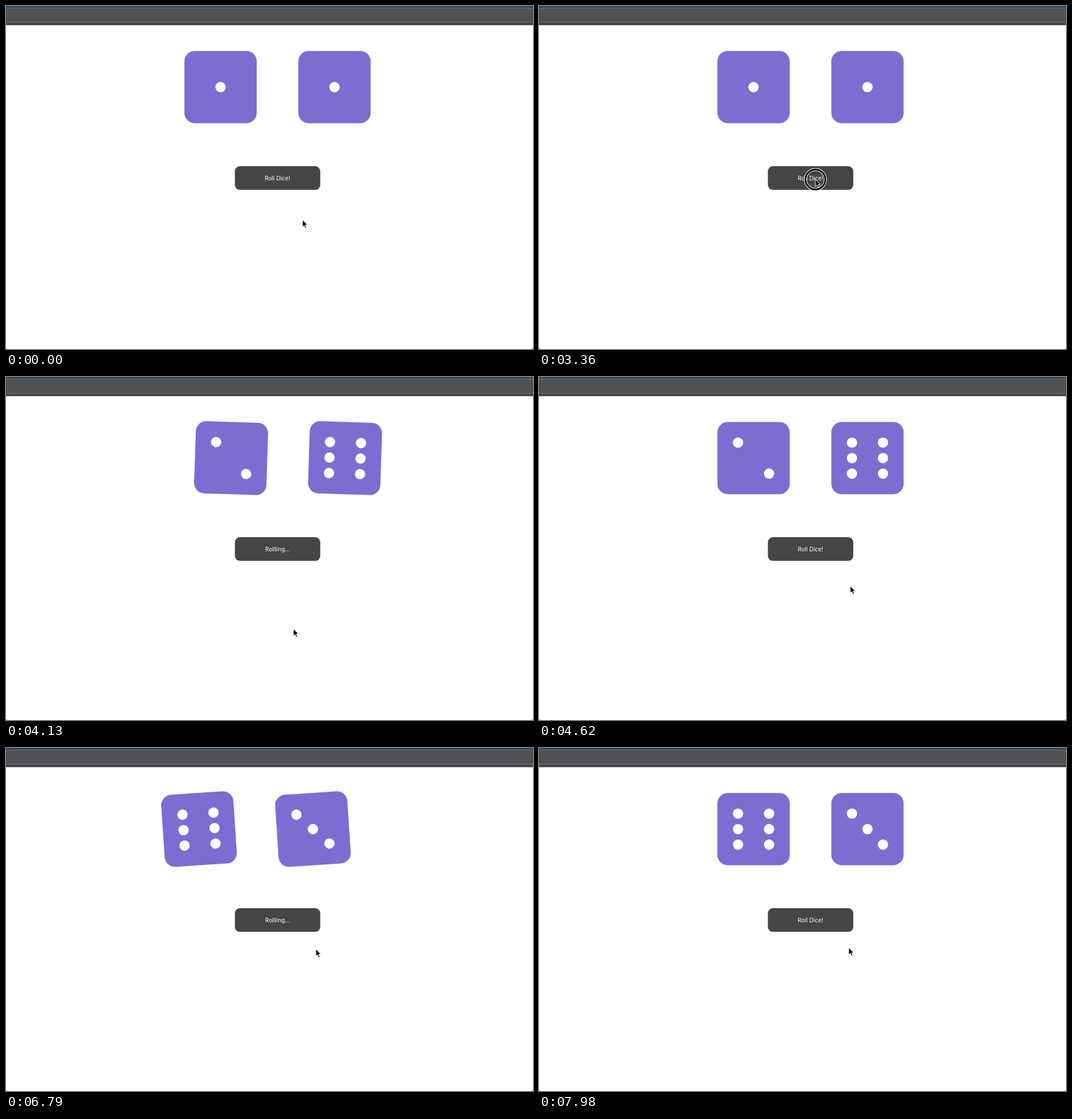
An HTML page that plays this animation: 927x604 px, repeating every 8 s.

```html
<!DOCTYPE html>
<html lang="en">
<head>
<meta charset="utf-8">
<title>Dice roller</title>
<style>
  html, body { margin: 0; width: 100%; height: 100%; overflow: hidden; background: #fff; }
  svg { display: block; width: 927px; height: 604px; }
  text { font: 10.2px Inter, "Open Sans", sans-serif; fill: #fff; text-anchor: middle; }
  .die rect { fill: #7c6dd2; }
  .die circle { fill: #fff; }
  #button { fill: color-mix(in srgb, #5c5294 calc(var(--hover) * 100%), #454545); }
</style>
</head>
<body>
<svg viewBox="0 0 927 604">
  <rect width="927" height="33.5" fill="#3b4553"/>
  <rect y="3" width="927" height="27" fill="#4a6f8d"/>
  <rect y="4.5" width="927" height="23.5" fill="#505153"/>
  <rect y="29.5" width="927" height="4" fill="#404144"/>
  <path d="M0 601.5V604H2.5Q.6 603.4 0 601.5M927 601.5V604H924.5Q926.4 603.4 927 601.5" fill="#8a8a8a"/>

  <g class="die"></g>
  <g class="die"></g>

  <rect id="button" x="402.6" y="282" width="150.2" height="41.8" rx="9"/>
  <text id="label" x="477.5" y="307.4"></text>

  <g id="cursor" stroke-linejoin="round">
    <g id="ring" fill="none" transform="translate(.7 1)">
      <circle r="17.5" stroke="#fff" stroke-width="5"/>
      <circle r="17.5" stroke="#000" stroke-width="3"/>
    </g>
    <path id="arrow" d="M.5 .5V13.2L3.4 10.5L5.3 15L7.5 14.1L5.6 9.7H9.5Z" fill="#000" stroke="#fff"/>
    <g id="hand" stroke="#000" stroke-width=".9">
      <path fill="#fff" d="M-.9 0C-.6-1.2 .8-1.2 1.2 0L2.4 4C3 3 4.3 3.1 4.6 4.2C5.2 3.2 6.3 3.6 6.6 4.7C7.4 4 8.3 4.6 8.3 5.7V8.5C8.3 10 7.4 11 7.2 13H1.8C.9 11-.8 9.8-2.2 7.7C-2.6 6.5-1.2 5.9 .4 7.4Z"/>
      <path fill="none" stroke-width=".7" d="M3 8V11M4.7 8V11M6.3 8V11"/>
    </g>
  </g>
</svg>
<script>
const LOOP = 8000, STEP = 70;
const ROLL = 1050, CLICK = 140, HOVER_START = 5110, HOVER_FADE = 200;
const DIE_LEFT = 377.4, DIE_GAP = 200.4, DIE_Y = 142.8;
const SIZE = 127.2, PIP_GAP = 27.3, SLOT = 200;

const rolls = [
  { start: 3490, faces: [2, 6] },
  { start: 6613, faces: [6, 3] }
];
const clicks = [2170, 3360, 6440];

const home = { x: 521, y: 376 };
const moves = [
  { start: 0, end: 140, x: 523.5, y: 379.5 },
  { start: 210, end: 770, x: 485.5, y: 304.5 },
  { start: 3500, end: 4130, x: 505, y: 443 },
  { start: 4410, end: 4970, x: 570, y: 326 },
  { start: 4970, end: 5530, x: 540, y: 311 },
  { start: 6580, end: 7350, x: 550, y: 404 },
  { start: 7770, end: 7980, x: 544.3, y: 351 }
];

const $ = id => document.getElementById(id);
const show = (id, visible) => $(id).style.display = visible ? "" : "none";
const mix = (a, b, k) => a + (b - a) * k;
const fraction = (t, start, end) => Math.max(0, Math.min(1, (t - start) / (end - start)));

// cubic-bezier(.25, .1, .25, 1)
function ease(x) {
  let lo = 0, hi = 1, s;
  for (let i = 0; i < 24; i++) {
    s = (lo + hi) / 2;
    if (.75 * s * (1 - s) + s ** 3 < x) lo = s; else hi = s;
  }
  return .3 * s * (1 - s) ** 2 + 3 * s * s * (1 - s) + s ** 3;
}

// Alternating swings, each one step smaller, the last one longer.
function wobble(progress) {
  const swing = k => k === 0 ? 0 : (-1) ** k * (6 - k) / 20;
  const k = Math.min(5, Math.floor(progress / .15));
  const part = fraction(progress, k * .15, k === 5 ? 1 : (k + 1) * .15);
  return mix(swing(k), swing(k + 1), ease(part));
}

function pointer(t) {
  return moves.reduce((from, move) => {
    if (t < move.start) return from;
    const k = ease(fraction(t, move.start, move.end));
    return { x: mix(from.x, move.x, k), y: mix(from.y, move.y, k) };
  }, home);
}

function dieMarkup(face) {
  let markup = `<rect x="${-SIZE / 2}" y="${-SIZE / 2}" width="${SIZE}" height="${SIZE}" rx="18.2"/>`;
  for (const x of [-1, 0, 1]) for (const y of [-1, 0, 1]) {
    const filled = x === 0 ? y === 0 && face % 2
      : y === 0 ? face === 6
      : x === y ? face > 1 : face > 3;
    if (filled) markup += `<circle cx="${x * PIP_GAP}" cy="${y * PIP_GAP}" r="9.1"/>`;
  }
  return markup;
}

const dice = [...document.querySelectorAll(".die")];

function draw(t) {
  const roll = rolls.filter(r => t >= r.start).pop() || { start: -ROLL, faces: [1, 1] };
  const progress = fraction(t, roll.start, roll.start + ROLL);
  const swing = wobble(progress);
  dice.forEach((die, i) => {
    const x = DIE_LEFT + i * DIE_GAP + swing * SLOT;
    die.innerHTML = dieMarkup(roll.faces[i]);
    die.setAttribute("transform", `translate(${x} ${DIE_Y}) rotate(${swing * 20})`);
  });

  const hovering = t > HOVER_START && t < rolls[1].start;
  const tint = hovering ? ease(fraction(t, HOVER_START, HOVER_START + HOVER_FADE)) : 0;
  $("button").style.setProperty("--hover", tint);
  $("label").textContent = progress < 1 ? "Rollling..." : "Roll Dice!";

  const { x, y } = pointer(t);
  $("cursor").setAttribute("transform", `translate(${x} ${y})`);
  show("arrow", !hovering);
  show("hand", hovering);
  show("ring", clicks.some(start => t >= start && t < start + CLICK));
}

const begin = performance.now();
function tick() {
  const t = (performance.now() - begin) % LOOP;
  draw(Math.floor(t / STEP) * STEP);
  requestAnimationFrame(tick);
}
tick();
</script>
</body>
</html>
```
